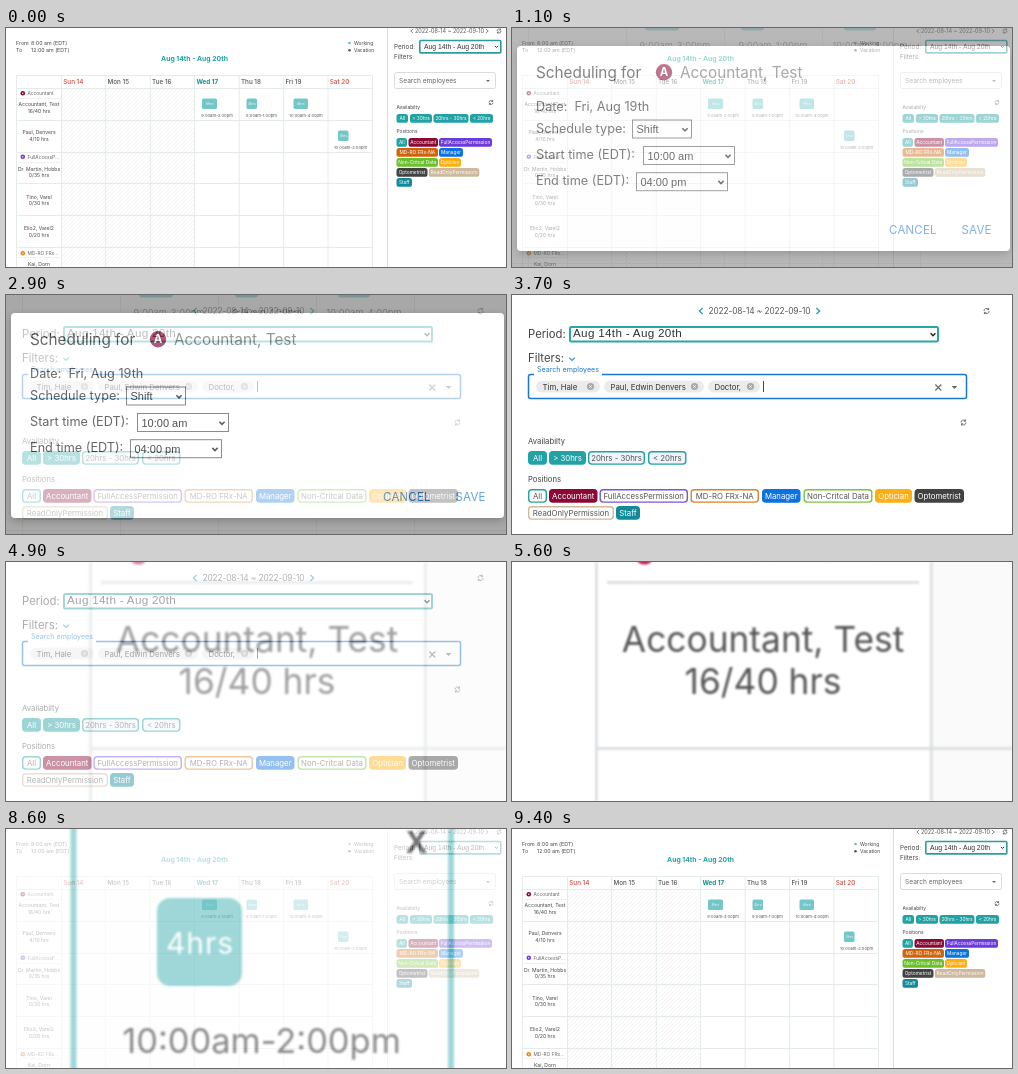
These frames come from a looping animation (500x239 px, 9.52 s). An HTML page:

```html
<!DOCTYPE html>
<html lang="en">
<head>
<meta charset="utf-8">
<title>Employee schedule</title>
<style>
html, body { margin: 0; width: 100%; height: 100%; overflow: hidden; background: #fff; }
svg { position: absolute; left: 0; top: 0; width: 500px; height: 239px; font-family: Inter, sans-serif; }
</style>
</head>
<body>
<script>
const TEAL = '#22a2a4', SOFT = '#74c7c9', WINE = '#8a0a35', BLUE = '#1976d2', INK = '#444';
const SANS = 'Liberation Sans, Arial, sans-serif';

const attrs = o => Object.entries(o).map(([k, v]) => ` ${k}="${v}"`).join('');
const text = (x, y, size, s, fill = INK, o = {}) =>
  `<text x="${x}" y="${y}" font-size="${size}" fill="${fill}" xml:space="preserve"${attrs(o)}>${s.replace(/</g, '&lt;')}</text>`;
const mid = (x, y, size, s, fill, o = {}) => text(x, y, size, s, fill, { 'text-anchor': 'middle', ...o });
const rect = (x, y, w, h, fill, o = {}) =>
  `<rect x="${x}" y="${y}" width="${w}" height="${h}" fill="${fill}"${attrs(o)}/>`;
const dot = (x, y, r, fill) => `<circle cx="${x}" cy="${y}" r="${r}" fill="${fill}"/>`;
const path = (d, stroke, w = 1, o = {}) =>
  `<path d="${d}" fill="none" stroke="${stroke}" stroke-width="${w}"${attrs(o)}/>`;
const chevron = (x, y, dx, dy, color, w) => dx
  ? path(`M${x - dx} ${y - dy}L${x + dx} ${y}L${x - dx} ${y + dy}`, color, w)
  : path(`M${x - dy} ${y - dy / 2}L${x} ${y + dy / 2}L${x + dy} ${y - dy / 2}`, color, w);
const caret = (x, y, r, color = '#666') => `<path d="M${x - r} ${y - r / 2}h${2 * r}l${-r} ${r}z" fill="${color}"/>`;
const refresh = (x, y, r) =>
  path(`M${x - r} ${y}a${r} ${r} 0 0 1 ${1.8 * r} ${-0.6 * r}m0 ${-0.6 * r}v${0.7 * r}h${-0.7 * r}` +
       `M${x + r} ${y}a${r} ${r} 0 0 1 ${-1.8 * r} ${0.6 * r}m0 ${0.6 * r}v${-0.7 * r}h${0.7 * r}`, '#555', 0.8);

// Tag with a solid or outlined body
const tag = (x, y, w, h, size, s, color, open, tint = '#fff') =>
  rect(x + 0.7, y + 0.7, w - 1.4, h - 1.4, open ? tint : color, { rx: h / 4.5, stroke: color, 'stroke-width': 1.4 }) +
  mid(x + w / 2, y + h / 2 + size * 0.36, size, s, open ? '#555' : '#fff');

function schedule() {
  const cols = [55.5, 99.7, 144.3, 188.6, 233.2, 277.7, 322, 366.5];
  const rows = [47.5, 60.5, 92.5, 124.5, 155.5, 187.5, 219.5];
  const days = ['Sun 14', 'Mon 15', 'Tue 16', 'Wed 17', 'Thu 18', 'Fri 19', 'Sat 20'];
  let s = `<defs><pattern id="hatch" width="4" height="4" patternUnits="userSpaceOnUse">
    <path d="M-1 1L1 -1M0 4L4 0M3 5L5 3" stroke="#ededed" stroke-width=".6"/></pattern></defs>`;
  s += rect(0, 0, 500, 239, '#fff') + rect(55, 60, 133, 179, 'url(#hatch)');
  s += text(10, 17, 5.3, 'From') + text(25, 17, 5.3, '8:00 am (EDT)') + text(10, 24, 5.3, 'To') + text(25, 24, 5.3, '12:00 am (EDT)');
  s += mid(188.5, 33.2, 6.8, 'Aug 14th - Aug 20th', TEAL, { 'font-weight': 700 });
  s += dot(343.5, 15, 1.3, '#5fc0c2') + text(348, 17, 4.9, 'Working') + dot(343.5, 22.3, 1.3, '#555') + text(348, 24.2, 4.9, 'Vacation');

  s += path(rows.map(y => `M10.5 ${y}H366.5`).join('') + 'M10.5 47.5V239' + cols.map(x => `M${x} 47.5V239`).join(''), '#e3eae6', 0.9);
  s += path('M12 70.5H54M12 134.5H54M12 229.5H54', '#e6e6e6', 0.6);
  days.forEach((d, i) => {
    s += text(cols[i] + 1.8, 56.3, 6.3, d, i % 6 ? (i === 3 ? '#12918f' : '#555') : '#d0493c', { 'font-weight': i === 3 ? 700 : 500 });
  });

  [['Accountant', 67, WINE], ['FullAccessP...', 130.5, '#6c3bd9'], ['MD-RO FRx...', 227, '#e08a1c']].forEach(([n, y, c]) => {
    s += dot(16.8, y - 1.8, 2.3, c) + dot(16.8, y - 1.8, 0.7, '#fff') + text(21.5, y, 4.8, n, '#666');
  });
  [['Accountant, Test', '16/40 hrs', 78], ['Paul, Denvers', '4/10 hrs', 105.8], ['Dr. Martin, Hobbs', '0/35 hrs', 142.5],
   ['Tino, Varel', '0/30 hrs', 170.5], ['Elio2, Varel2', '0/20 hrs', 202], ['Kai, Dorn', '', 237.5]].forEach(([n, h, y]) => {
    s += mid(33, y, 5.1, n) + mid(33, y + 6.7, 5.1, h);
  });
  [[196, 70.5, 15, '6hrs', 211, '9:00am-3:00pm'], [240.5, 70.5, 10.5, '4hrs', 255.5, '9:00am-1:00pm'],
   [287.5, 70.5, 14.5, '6hrs', 300, '10:00am-4:00pm'], [332, 102.5, 10.5, '4hrs', 344.5, '10:00am-2:00pm']].forEach(([x, y, w, h, cx, t]) => {
    s += rect(x, y, w, 10.5, SOFT, { rx: 1.6 }) + mid(x + w / 2, y + 6.6, 3.6, h, '#eaf8f8') + mid(cx, y + 18.6, 4.1, t, '#555');
  });

  s += path('M381.5 0V239', '#ddd', 1);
  s += chevron(406, 3, -1.2, 2, '#666', 0.8) + mid(443.5, 5, 5.5, '2022-08-14 ~ 2022-09-10', '#555') + chevron(481, 3, 1.2, 2, '#666', 0.8) + refresh(493, 3, 2);
  s += text(388, 21, 6.3, 'Period:') + text(388, 31, 6.3, 'Filters:');
  s += rect(413.8, 12.5, 81, 12.4, '#fff', { rx: 1, stroke: '#2b9c9f', 'stroke-width': 1.6 });
  s += text(418, 21.3, 6.8, 'Aug 14th - Aug 20th', '#333', { 'font-family': SANS }) + chevron(490.5, 18.7, 0, 1.6, '#333', 1);
  s += rect(388.5, 44.5, 101, 16, '#fff', { rx: 2, stroke: '#d2d2d2', 'stroke-width': 0.8 });
  s += text(393, 55, 6.6, 'Search employees', '#666') + caret(482, 53, 2) + refresh(485, 74.5, 2);
  s += text(390.5, 81.2, 4.9, 'Availabilty') + text(390.5, 104.8, 4.9, 'Positions');
  [[390.5, 86, 11.5, 'All'], [404, 86, 22, '> 30hrs'], [427.5, 86, 35, '20hrs - 30hrs'], [464, 86, 23, '< 20hrs'],
   [390.5, 110, 10.5, 'All'], [402.5, 110, 29.5, 'Accountant', WINE], [433, 110, 53, 'FullAccessPermission', '#6c3bd9'],
   [390.5, 120, 41.5, 'MD-RO FRx-NA', '#cf650f'], [433, 120, 24, 'Manager', '#0b72e0'],
   [390.5, 130, 41.5, 'Non-Critcal Data', '#6cc02c'], [433, 130, 22, 'Optician', '#ffae12'],
   [390.5, 140, 31, 'Optometrist', '#424242'], [422.8, 140, 50.5, 'ReadOnlyPermission', '#cdb99c'],
   [390.5, 150, 15.5, 'Staff', '#138a98']].forEach(([x, y, w, n, c = TEAL]) => {
    s += tag(x, y, w, 8.8, 4.8, n, c);
  });
  return s;
}

function dialog() {
  let s = '<defs><filter id="shade" x="-5%" y="-10%" width="110%" height="120%"><feDropShadow dx="0" dy="3" stdDeviation="4" flood-opacity=".45"/></filter></defs>';
  s += rect(0, 0, 500, 239, '#808080') + path('M16.5 0V239M114.5 0V239M212.5 0V239M310.5 0V239M408.5 0V239M0 235.5H500', '#737373', 1);
  [[133, 34, 163, '9:00am-3:00pm'], [229, 23, 261, '9:00am-1:00pm'], [332, 32, 358, '10:00am-4:00pm']].forEach(([x, w, c, t]) => {
    s += rect(x, -6, w, 8.5, '#3a6566', { rx: 3 }) + mid(c, 21, 9.2, t, '#333');
  });
  s += rect(5, 18, 493, 205, '#fff', { rx: 4, filter: 'url(#shade)' });
  s += text(24, 50, 15.3, 'Scheduling for', '#222') + dot(152, 44.3, 8.2, WINE) + mid(152, 48.4, 11.5, 'A', '#fff', { 'font-weight': 700 });
  s += text(168, 50, 15.3, 'Accountant, Test', '#666');
  s += text(24, 83, 12.7, 'Date:  Fri, Aug 19th', '#222');
  [[104.5, 'Schedule type:', 120, 60, 'Shift'], [131, 'Start time (EDT):', 131, 92, '10:00 am'], [157.2, 'End time (EDT):', 124, 92, '04:00 pm']].forEach(([y, n, x, w, v]) => {
    s += text(24, y, 12.7, n, '#222') + rect(x + 0.5, y - 12.5, w - 1, 18, '#fff', { stroke: '#555' });
    s += text(x + 4.5, y + 0.8, 11, v, '#000', { 'font-family': SANS }) + chevron(x + w - 7, y - 3, 0, 2.6, '#111', 1.6);
  });
  return s + text(377, 206, 11.5, 'CANCEL', BLUE, { 'letter-spacing': 0.2 }) + text(449.5, 206, 11.5, 'SAVE', BLUE, { 'letter-spacing': 0.2 });
}

function filters() {
  let s = rect(0, 0, 500, 239, '#fff');
  s += chevron(189, 16, -1.6, 3, TEAL, 1.3) + mid(247.5, 19.3, 8.3, '2022-08-14 ~ 2022-09-10', '#555', { 'letter-spacing': -0.1 }) + chevron(306, 16, 1.6, 3, TEAL, 1.3) + refresh(474.5, 16, 2.6);
  s += text(16, 43, 11.3, 'Period:') + rect(58, 32, 368, 14.5, '#fff', { rx: 1.5, stroke: '#2ba5a5', 'stroke-width': 2 });
  s += text(61, 42.4, 11.7, 'Aug 14th - Aug 20th', '#333', { 'font-family': SANS, 'letter-spacing': 0.3 }) + chevron(421, 39.5, 0, 2.4, '#222', 1.5);
  s += text(16, 67, 11.3, 'Filters:') + chevron(60, 64, 0, 2.8, TEAL, 1.3);
  s += rect(16.5, 79.5, 438, 24, '#fff', { rx: 2, stroke: BLUE, 'stroke-width': 1.5 }) + rect(22, 78, 68, 3, '#fff') + text(25, 76.6, 7.1, 'Search employees', BLUE);
  [[24, 64, 'Tim, Hale'], [92, 100, 'Paul, Edwin Denvers'], [196, 52, 'Doctor,']].forEach(([x, w, n]) => {
    const c = x + w - 9.5;
    s += rect(x, 85.8, w, 11.6, '#ebebeb', { rx: 5.8 }) + text(x + 6.5, 94.5, 7.8, n, '#333');
    s += dot(c, 91.5, 3.6, '#a9a9a9') + path(`M${c - 1.3} 90.2l2.6 2.6m0 -2.6l-2.6 2.6`, '#fff', 0.8);
  });
  s += path('M251.5 86V97', '#333', 0.9) + path('M423.3 89.5l6 6m0 -6l-6 6', '#666', 1.1) + caret(442.5, 92.5, 2.8) + refresh(451.5, 127.5, 2.5);
  s += text(16, 149, 7.7, 'Availabilty') + text(16, 187, 7.7, 'Positions');
  [[16, 156, 19, 'All', TEAL], [37, 156, 37, '> 30hrs', TEAL], [76, 156, 57, '20hrs - 30hrs', TEAL, 1, '#eef4fa'], [136, 156, 38.5, '< 20hrs', TEAL, 1, '#eef4fa'],
   [16, 194, 19, 'All', TEAL, 1], [37, 194, 48.5, 'Accountant', WINE], [87.5, 194, 88.5, 'FullAccessPermission', '#7a55dc', 1],
   [178.5, 194, 68.5, 'MD-RO FRx-NA', '#d9822b', 1], [250, 194, 38.5, 'Manager', '#0b72e0'], [291.5, 194, 69, 'Non-Critcal Data', '#7cc142', 1],
   [363, 194, 37, 'Optician', '#ffae12'], [402.5, 194, 49.5, 'Optometrist', '#424242'],
   [16, 211, 86, 'ReadOnlyPermission', '#cdb99c', 1], [104, 211, 24, 'Staff', '#138a98']].forEach(([x, y, w, n, c, open, tint]) => {
    s += tag(x, y, w, 13.8, 7.8, n, c, open, tint);
  });
  return s;
}

const blur = { style: 'filter:blur(1px)' };

function hours() {
  return rect(0, 0, 500, 239, '#fff') + rect(420, 0, 80, 239, '#fafafa') +
    path('M84.5 0V239M419.3 0V239M95 20.5H407M85 186.5H500', '#d8dbdc', 2.5, blur) +
    `<ellipse cx="132.5" cy="-1.5" rx="7" ry="4" fill="#b8205a" ${attrs(blur)}/>` + text(186, -1, 31, 'Accountant', '#999', { ...blur, opacity: 0.4 }) +
    mid(251, 90, 35.3, 'Accountant, Test', '#555', blur) + mid(251, 132, 35.3, '16/40 hrs', '#555', blur);
}

function shift() {
  return rect(0, 0, 500, 239, '#fff') + path('M67.5 -5V244M445 -5V244', SOFT, 6, blur) +
    mid(410.5, 24, 30, 'X', '#333', { ...blur, 'font-weight': 700 }) + rect(151, 69, 85, 88, SOFT, { rx: 13, ...blur }) +
    mid(194, 125, 30, '4hrs', '#fff', { ...blur, 'letter-spacing': 1 }) + mid(255.5, 224, 34.4, '10:00am-2:00pm', '#555', blur);
}

const LOOP = 9520, GAP = 1900, FIRST = 1000, STEP = 100;
const FADE = [.32, .56, .73, .84, .91, .95, .976, .99, 1];
const start = i => FIRST + (i - 1) * GAP;

// Held opacity keyframes from [time, opacity] pairs
const hold = pairs => pairs.map(([t, opacity]) => ({ offset: t / LOOP, opacity, easing: 'step-end' }));

[schedule, dialog, filters, hours, shift].forEach((draw, i, all) => {
  document.body.insertAdjacentHTML('beforeend', `<svg viewBox="0 0 500 239">${draw()}</svg>`);
  if (!i) return;
  const last = i === all.length - 1;
  const count = [0, 6, 9, 6, 7][i];
  const steps = [[0, 0]];
  for (let k = 0; k < count; k++) {
    const full = k === count - 1 && !last;
    steps.push([start(i) + k * STEP, full ? 1 : FADE[k]]);
  }
  if (last) FADE.forEach((a, k) => steps.push([start(i + 1) + k * STEP, 1 - a]));
  else steps.push([i === 3 ? start(5) : start(i + 1) + 8 * STEP, 0]);
  steps.push([LOOP, 0]);
  document.body.lastElementChild.animate(hold(steps), { duration: LOOP, iterations: Infinity });
});
</script>
</body>
</html>
```
